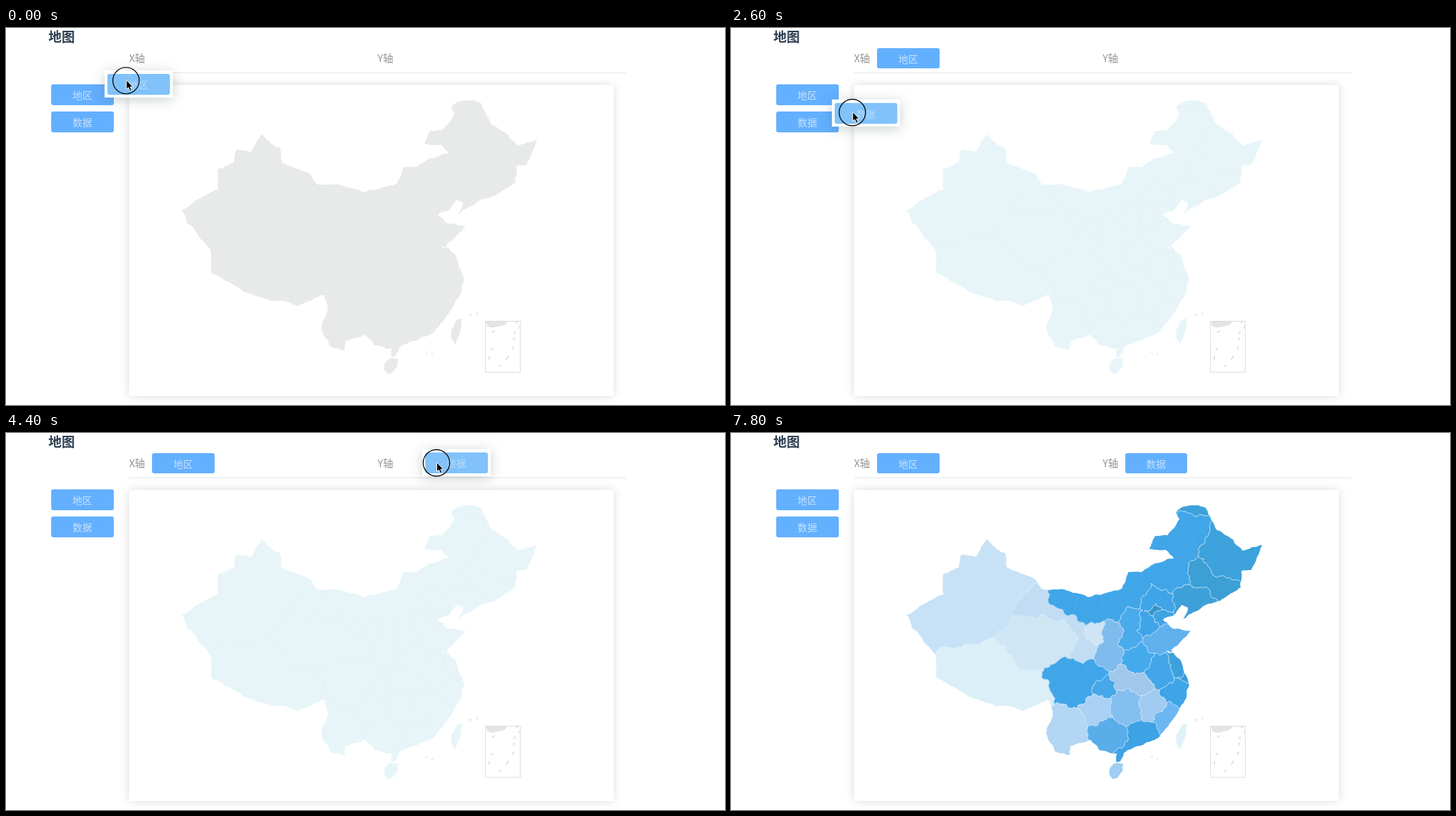
Recreate the animation shown at these times as an HTML page. Size 1034 by 542 pixels, loop 8000 ms.

```html
<!DOCTYPE html>
<html lang="zh-CN">
<head>
<meta charset="utf-8">
<title>地图</title>
<style>
html, body { margin: 0; width: 100%; height: 100%; overflow: hidden; background: #fff; }
body { position: relative; font-family: "Noto Sans CJK SC", "Noto Sans CJK", "Noto Sans", sans-serif; }
body > * { position: absolute; white-space: nowrap; }
h1 { left: 61px; top: 0; margin: 0; font-size: 19px; line-height: 24px; color: #2c3e50; }
.axis { top: 33px; font-size: 14.5px; line-height: 20px; color: #949494; }
.chip { width: 89.5px; height: 29.5px; border-radius: 3px; background: #63b0ff; color: #c8e2fd;
  font-size: 14px; font-weight: 300; line-height: 30px; text-align: center; }
.rule { left: 177px; top: 63.5px; width: 715px; height: 1px; background: #e6e6e6; }
.card { left: 177px; top: 82px; width: 697px; height: 447px; background: #fff; box-shadow: 0 0 13px rgba(0,0,0,.14); }
svg { left: 0; top: 0; }
#ghost { left: 0; top: 0; width: 98px; height: 39px; background: #fff; box-shadow: 0 3px 18px rgba(60,80,80,.27); }
#ghost .chip { position: absolute; left: 4px; top: 5px; background: #81c2fb; color: #b5dbfc; }
.land { fill: #e8eaea; stroke: #e8eaea; stroke-width: .6; }
.placed .land { fill: #e7f5f9; stroke: #e7f5f9; }
.colored .land { fill: var(--c); stroke: var(--c); }
#borders { fill: none; stroke: none; stroke-width: .8; stroke-linejoin: round; }
.placed #borders { stroke: #e0eff3; }
.colored #borders { stroke: #dceefa; }
.minor { fill: #e3e5e5; }
</style>
</head>
<body>
<h1>地图</h1>
<div class="axis" style="left:177px">X轴</div>
<div class="axis" style="left:534.5px">Y轴</div>
<div class="rule"></div>
<div class="card"></div>
<div class="chip" style="left:65px;top:81px">地区</div>
<div class="chip" style="left:65px;top:120px">数据</div>
<div class="chip" id="xChip" style="left:210px;top:28.5px">地区</div>
<div class="chip" id="yChip" style="left:566.5px;top:28.5px">数据</div>
<svg id="map" width="1034" height="542">
  <clipPath id="coast"><path id="coastPath"/></clipPath>
  <g clip-path="url(#coast)"><g id="regions"></g><path id="borders"/></g>
  <g id="isles"></g>
  <g class="minor">
    <path d="M666 412l3-1 1 2-3 1zM676 410l3-1 0 2-2 1zM604 465h2v2h-2zM612 468h2v2h-2z"/>
    <path d="M690 422H721L717 427 700 431 692 429zM733 422H737L734 426zM739 427V430L735 433z"/>
  </g>
  <path d="M699 438l4-3M731 440l1-4M730 449l1-4M728 463l2-5M719 477l4-6M709 486l4-1M695 472v5M697 463l3-3"
    stroke="#e0e2e2" stroke-width="2"/>
  <rect x="689.5" y="421.5" width="50" height="73.5" fill="none" stroke="#dcdddd"/>
</svg>
<div id="ghost"><div class="chip" id="ghostChip">地区</div></div>
<svg width="1034" height="542">
  <g id="cursor">
    <circle id="press" r="19" fill="none" stroke="#111" stroke-width="1.4"/>
    <path d="M.5-1V12.5L3.5 10 5.8 15 8.2 14 6 9.2H10Z" fill="#000" stroke="#fff" stroke-width="1"/>
  </g>
</svg>
<script>
const $ = id => document.getElementById(id);

// Splits an edge with small repeatable offsets, the same from either end.
function rough(a, b, amp, out) {
  const dx = b[0] - a[0], dy = b[1] - a[1], len = Math.hypot(dx, dy);
  if (len < 5) return out.push(b);
  const h = Math.sin((a[0] + b[0]) * 12.9898 + (a[1] + b[1]) * 78.233) * 437.585;
  const flip = dx > 0 || (dx === 0 && dy > 0) ? 1 : -1;
  const k = (h - Math.floor(h) - .5) * flip * Math.min(amp, 12 * amp / len);
  const mid = [(a[0] + b[0]) / 2 - dy * k, (a[1] + b[1]) / 2 + dx * k];
  rough(a, mid, amp, out);
  rough(mid, b, amp, out);
}
function line(a, b, amp) {
  const out = [a];
  rough(a, b, amp, out);
  return out.map(p => p.map(v => v.toFixed(1)).join(' ')).join('L');
}
const ring = (pts, amp) =>
  'M' + pts.map((p, i) => line(p, pts[(i + 1) % pts.length], amp)).join('L') + 'Z';
const points = s => s.trim().split(/\s+/).map(p => p.split(',').map(Number));

function addLand(parent, color, d) {
  const el = document.createElementNS('http://www.w3.org/2000/svg', 'path');
  el.setAttribute('class', 'land');
  el.setAttribute('d', d);
  el.style.setProperty('--c', color);
  $(parent).append(el);
}

$('coastPath').setAttribute('d', ring(points(`
  253,262 271,249 306,232 305,203 328,193 331,175 352,178 368,152 382,167 394,172 397,194 436,209
  447,224 479,225 513,236 562,224 571,200 590,200 612,187 637,180 625,168 602,167 610,148 628,147
  645,124 640,114 650,106 668,104 683,108 699,140 722,153 735,169 764,161 748,197 734,198 733,222
  710,237 683,247 650,268 657,251 648,247 635,263 621,268 632,279 661,284 633,312 648,330 656,352
  659,362 651,388 630,419 615,438 565,460 560,472 554,473 555,461 530,456 517,441 488,450 487,463
  466,458 453,432 463,405 458,384 420,400 405,394 381,393 350,382 296,353 294,318 272,291 260,280`), .22));

// Each province is a few discs "x,y,radius"; borders are the power diagram of all discs.
const provinces = {
  '#c7e2f6': '340,240,60 400,215,27',
  '#daeff8': '365,345,45 425,375,32',
  '#cfe6f5': '440,302,40 470,297,27 410,305,22',
  '#c2ddf3': '437,243,18 468,260,8 493,278,9 508,310,17',
  '#cfe4f4': '526,287,13',
  '#41a6e8': '480,240,18 515,252,22 550,248,22 580,230,18 635,205,24 640,160,28 668,138,18',
  '#3da2db': '712,172,34 705,145,16 672,112,10',
  '#3c9fd5': '705,222,16 672,203,14',
  '#3da0d8': '655,240,18 676,240,12',
  '#3fa5e8': '603,240,11 621,241,12 597,275,13',
  '#3895c9': '610,251,8',
  '#3fa3e2': '617,262,5',
  '#49abec': '575,268,14 571,296,13',
  '#80bbed': '548,288,14 543,318,17',
  '#61b0ee': '612,297,13 638,292,17',
  '#44aaec': '585,325,20',
  '#42a6e8': '616,342,20',
  '#3da2dc': '642,332,16',
  '#3d9dd2': '653,348,4',
  '#3ea5e8': '642,373,18',
  '#a0c8ea': '565,352,14 590,360,13',
  '#46a8e9': '535,366,11',
  '#41a6e9': '492,360,30 470,340,15 520,346,15',
  '#b3d6f5': '480,425,26',
  '#a9d1f4': '527,398,20',
  '#85bff0': '571,392,22',
  '#a1cbf0': '606,393,18',
  '#6ab7f2': '626,409,17',
  '#59aeea': '541,435,22',
  '#3ea3e4': '592,438,20 565,462,8'
};
const discs = Object.entries(provinces).flatMap(([color, list]) =>
  points(list).map(([x, y, r]) => ({ x, y, r, color })));
const power = (d, [x, y]) => (x - d.x) ** 2 + (y - d.y) ** 2 - d.r ** 2;

// Clips the stage to the area of one disc; each corner keeps the disc behind its next edge.
function cell(disc) {
  let poly = [[230, 80], [790, 80], [790, 500], [230, 500]].map(p => ({ p, by: disc }));
  for (const other of discs) {
    if (other === disc) continue;
    const next = [];
    poly.forEach((a, i) => {
      const b = poly[(i + 1) % poly.length];
      const fa = power(disc, a.p) - power(other, a.p), fb = power(disc, b.p) - power(other, b.p);
      if (fa <= 0) next.push(a);
      if (fa <= 0 !== fb <= 0) {
        const k = fa / (fa - fb);
        next.push({ p: a.p.map((v, n) => v + (b.p[n] - v) * k), by: fa <= 0 ? other : a.by });
      }
    });
    poly = next;
  }
  return poly.map(({ p, by }) => ({ p: p.map(Math.round), by }));
}

let borders = '';
for (const disc of discs) {
  const poly = cell(disc);
  addLand('regions', disc.color, ring(poly.map(c => c.p), .6));
  poly.forEach((c, i) => {
    if (c.by.color < disc.color) borders += 'M' + line(c.p, poly[(i + 1) % poly.length].p, .6);
  });
}
$('borders').setAttribute('d', borders);
addLand('isles', '#a0cdf3', ring(points('545,482 552,475 564,476 563,485 555,496 549,497 544,490'), .2));
addLand('isles', '#e0f2f9', ring(points('649,419 655,418 652,440 646,455 640,444 640,435'), .2));

// Cursor legs: start time, end time, x, y; it rests between legs.
const legs = [[-100, 900, 259, 45], [1000, 1800, 81, 134], [2200, 3000, 268, 109], [3400, 3700, 475, 55],
  [3700, 4300, 619, 43], [4900, 5100, 692, 71], [5500, 5900, 764, 104], [6100, 7000, 798, 153],
  [7000, 7200, 886, 250], [7300, 7800, 983, 545]];
function cursorAt(t) {
  let x = 163, y = 79;
  for (const [t0, t1, tx, ty] of legs) {
    const k = Math.max(0, Math.min(1, (t - t0) / (t1 - t0)));
    x += (tx - x) * k;
    y += (ty - y) * k;
  }
  return [x, y];
}
const move = (id, x, y) => $(id).style.transform = `translate(${x}px,${y}px)`;
const show = (id, on) => $(id).style.visibility = on ? 'visible' : 'hidden';

const lag = 40, start = performance.now();
function draw() {
  const t = Math.floor((performance.now() - start) % 8000 / 100) * 100;
  const first = t < 1100, dragging = first || (t >= 2200 && t < 5000);
  const pointer = cursorAt(first ? Math.min(t, 1000) : t);
  const [gx, gy] = cursorAt((first ? Math.min(t, 1000) : t) - lag);
  move('cursor', ...pointer);
  move('ghost', gx - (first ? 27 : 20), gy - (first ? 16 : 20));
  $('ghostChip').textContent = first ? '地区' : '数据';
  show('ghost', dragging);
  show('press', dragging);
  show('cursor', t < 7800);
  show('xChip', !first);
  show('yChip', t >= 5000);
  $('map').setAttribute('class', first ? '' : t < 5000 ? 'placed' : 'colored');
  requestAnimationFrame(draw);
}
draw();
</script>
</body>
</html>
```
